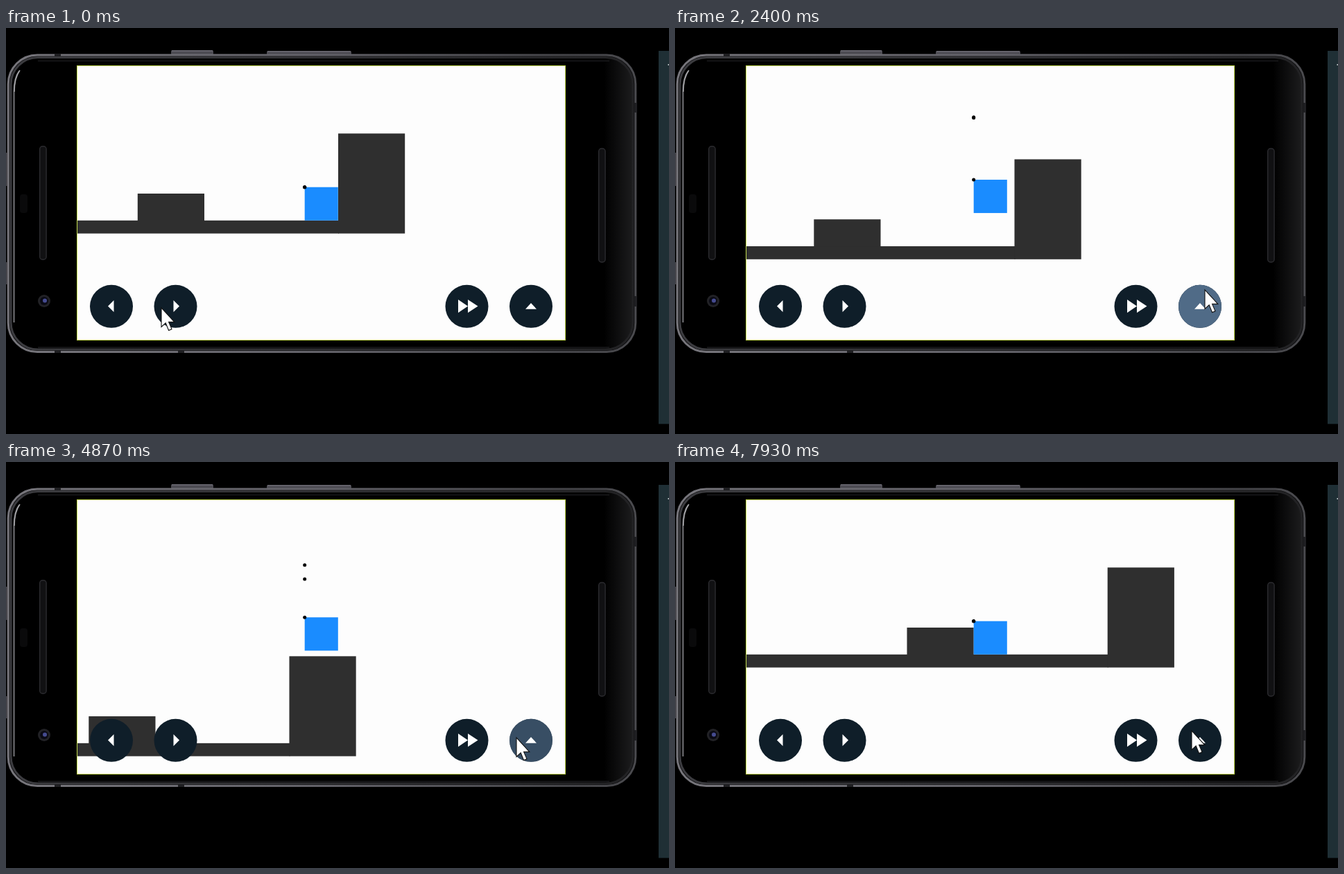
An HTML page for the animation above (8 s loop, 956 by 586 pixels).

```html
<!DOCTYPE html>
<html lang="en">
<head>
<meta charset="utf-8">
<title>Jumping box</title>
<style>
  html, body { margin: 0; width: 100%; height: 100%; overflow: hidden; background: #000; }
  svg { display: block; width: 956px; height: 586px; }
</style>
</head>
<body>
<svg viewBox="0 0 956 586">
  <defs>
    <clipPath id="screen"><rect x="103" y="55" width="703" height="395"/></clipPath>
    <linearGradient id="rim" gradientUnits="userSpaceOnUse" x1="0" y1="0" x2="910" y2="0">
      <stop offset="0" stop-color="#77767c"/>
      <stop offset=".5" stop-color="#626168"/>
      <stop offset=".9" stop-color="#444448"/>
      <stop offset="1" stop-color="#4a4a4e"/>
    </linearGradient>
    <linearGradient id="band" gradientUnits="userSpaceOnUse" x1="0" y1="0" x2="910" y2="0">
      <stop offset="0" stop-color="#3c3c40"/>
      <stop offset="1" stop-color="#222224"/>
    </linearGradient>
    <linearGradient id="shade" gradientUnits="userSpaceOnUse" x1="862" y1="0" x2="905" y2="0">
      <stop offset="0" stop-color="#000"/>
      <stop offset="1" stop-color="#1d1d1e"/>
    </linearGradient>
  </defs>
  <rect width="956" height="586"/>

  <!-- phone -->
  <g fill="#4c4b52">
    <rect x="238" y="32" width="61" height="7" rx="2"/>
    <rect x="376" y="33" width="122" height="6" rx="2"/>
    <path d="M239 33H298M377 34H497" stroke="#7c7a84"/>
    <rect x="0" y="180" width="1.5" height="48"/>
    <rect x="0" y="338" width="1.5" height="32"/>
  </g>
  <rect x="3.2" y="39" width="904.6" height="428.6" rx="42" fill="#0b0b0c" stroke="url(#rim)" stroke-width="3"/>
  <rect x="7" y="42.5" width="897" height="421.5" rx="39" fill="url(#shade)" stroke="url(#band)" stroke-width="3"/>
  <path d="M46 47.5H870M46 461H870" stroke="#1a1a1c" stroke-width="1.6"/>
  <path d="M11.5 425V92Q11.5 72 19 62" fill="none" stroke="#77777b" stroke-width="2"/>
  <path d="M12 92Q12 72 20 61" fill="none" stroke="#a5a5a8" stroke-width="1.6"/>
  <path d="M70 39H79M70 467H79M248 467H257M908 108V122M908 387V402" stroke="#1f1f22" stroke-width="4"/>
  <g fill="#111113" stroke="#2b2b2f" stroke-width="1.4">
    <rect x="48.7" y="170.7" width="9.4" height="163.6" rx="4"/>
    <rect x="854.7" y="174" width="9.4" height="164" rx="4"/>
  </g>
  <rect x="20" y="240" width="11" height="27" rx="4" fill="#0a0a0b"/>
  <circle cx="55" cy="394" r="9" fill="#222226"/>
  <circle cx="55" cy="394" r="6" fill="#0a0a14"/>
  <circle cx="56" cy="393.5" r="3" fill="#454b90"/>
  <rect x="941" y="33" width="15" height="538.5" fill="#1f2f35"/>
  <rect x="954.5" y="52" width="1.5" height="2" fill="#b8c0c2"/>

  <!-- game -->
  <rect x="102.5" y="54.5" width="704" height="396" fill="#fdfdfd" stroke="#c2dc4c"/>
  <g clip-path="url(#screen)">
    <g id="world" fill="#2f2f2f">
      <rect x="-400" y="277.8" width="880" height="18.8"/>
      <rect x="189.8" y="239" width="96.2" height="39.2"/>
      <rect x="479" y="152.3" width="96.2" height="144.3"/>
    </g>
    <g id="box">
      <rect x="430.7" y="229.7" width="48.1" height="48.1" fill="#1a8cff"/>
      <circle class="dot" cx="430.7" cy="229.7" r="2.5"/>
      <circle class="dot" cx="430.7" cy="229.7" r="2.5"/>
      <circle cx="430.7" cy="229.7" r="2.5"/>
    </g>
    <g id="buttons"></g>
  </g>
  <path id="cursor" d="M0 0V27.5L6.2 21.8L10.6 32.5L15 30.6L10.6 20.4H18.8Z" fill="#fff" stroke="#111" stroke-width="1.1"/>
</svg>
<script>
const LOOP = 8000;
const SPEED = 0.175, JUMP = 0.95, GRAVITY = 0.0029;   // px and ms
const TOWER = 126, STEP = 39, STEP_X = -144.7;
const CAMERA_LAG = 14.2, DOT_LAGS = [7, 11.5];

const moves = [[300, 797, -1], [1197, 1634, 1], [3177, 3640, 1], [6076, 7350, -1]];
const jumps = [2346, 2767, 4863, 5072];

// time, x, y
const path = [
  [0, 224, 404], [60, 222, 404], [270, 148, 401], [830, 148, 402], [1100, 239, 400],
  [1130, 240, 400], [1634, 244, 404], [1730, 244, 404], [2230, 764, 378], [2935, 764, 378],
  [3165, 244, 405], [4270, 246, 405], [4700, 736, 398], [4880, 736, 398], [5060, 757, 396],
  [5870, 761, 396], [5880, 761, 396], [6066, 150, 402], [7480, 150, 402], [7900, 745, 388], [LOOP, 745, 388]
];

const pressed = {
  left: moves.filter(m => m[2] < 0),
  right: moves.filter(m => m[2] > 0),
  fast: [],
  up: jumps.map(t => [t - 30, t + 80])
};

const icons = [
  ['left', 152, 'M147 401.5L155.5 393V410Z'],
  ['right', 244.5, 'M250 401.5L241.5 393V410Z'],
  ['fast', 664.5, 'M652 392L666 401.5V392L680.5 401.5L666 411V401.5L652 411Z'],
  ['up', 757, 'M749 405.7L757 397L765 405.7Z']
];

const $ = id => document.getElementById(id);
$('buttons').innerHTML = icons.map(([id, x, d]) =>
  `<circle cx="${x}" cy="401.8" r="31" fill="#0f1e29"/>` +
  `<circle id="${id}" cx="${x}" cy="401.8" r="31" fill="#506b87" opacity="0"/>` +
  `<path d="${d}" fill="#fff"/>`).join('');
const dots = document.querySelectorAll('.dot');

// The whole run is computed once, one state per millisecond.
function simulate() {
  const states = [];
  let x = 0, h = 0, v = 0, camX = 0, camY = 0;
  const lead = [0, 0];
  for (let t = 0; t <= LOOP; t++) {
    states.push({ x, h, camX, camY, lead: [...lead] });
    const move = moves.find(m => t >= m[0] && t < m[1]);
    if (move) x += move[2] * SPEED;
    if (h < TOWER) x = Math.min(x, 0);
    if (h < STEP) x = Math.max(x, STEP_X);

    const floor = x > 0.01 ? TOWER : 0;
    if (jumps.includes(t)) v = JUMP;
    else v -= GRAVITY;
    h += v;
    if (h <= floor) { h = floor; v = 0; }

    camX += (x - camX) / CAMERA_LAG;
    camY += (h - camY) / CAMERA_LAG;
    const goal = Math.sign(v) * Math.max(0, 136 * Math.abs(v) - 21);
    DOT_LAGS.forEach((lag, i) => { lead[i] += (goal - lead[i]) / lag; });
  }
  return states;
}
const states = simulate();

const clamp = n => Math.max(0, Math.min(1, n));
const glow = (spans, t) => Math.max(0, ...spans.map(([a, b]) =>
  Math.min(clamp((t - a) / 60), clamp((b + 60 - t) / 60))));

function cursorAt(t) {
  const i = path.findIndex(p => p[0] > t);
  const [t0, x0, y0] = path[i - 1], [t1, x1, y1] = path[i];
  const k = (t - t0) / (t1 - t0), e = k * k * (3 - 2 * k);
  return [x0 + (x1 - x0) * e, y0 + (y1 - y0) * e];
}

const place = (el, x, y) => el.setAttribute('transform', `translate(${x.toFixed(2)} ${y.toFixed(2)})`);

function draw(t) {
  const s = states[Math.floor(t)];
  place($('world'), -s.camX, s.camY);
  place($('box'), s.x - s.camX, s.camY - s.h);
  dots.forEach((dot, i) => place(dot, 0, -s.lead[i]));
  for (const id in pressed) $(id).setAttribute('opacity', glow(pressed[id], t).toFixed(2));
  place($('cursor'), ...cursorAt(t));
}

const start = performance.now();
function tick() {
  draw((performance.now() - start) % LOOP);
  requestAnimationFrame(tick);
}
tick();
</script>
</body>
</html>
```
